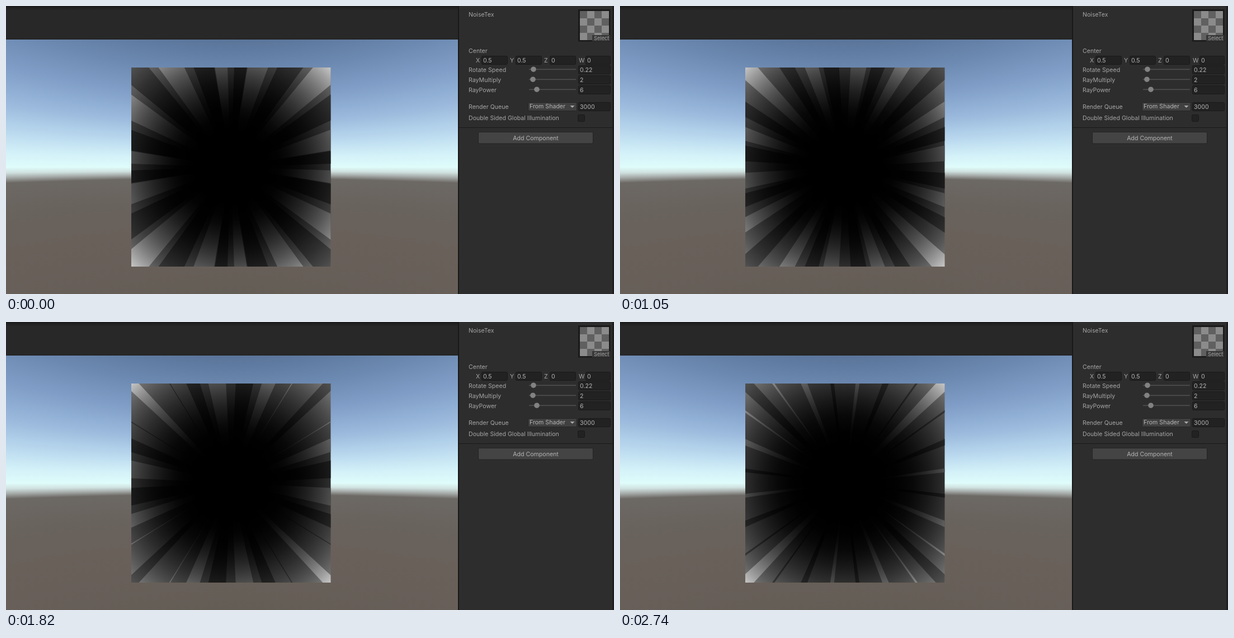
An HTML page with a canvas for the animation above (2.81 s loop, 1087 px wide and 515 px high).

```html
<!DOCTYPE html>
<html lang="en">
<head>
<meta charset="utf-8">
<title>Radial rays</title>
<style>
  html, body { margin: 0; width: 100%; height: 100%; overflow: hidden; background: #2d2d2d; }
  canvas, svg { position: absolute; left: 0; top: 0; display: block; }
  canvas { top: 60px; }
  text { font: 10.6px Inter, Roboto, sans-serif; fill: #a6a6a6; }
  .value { fill: #b4b4b4; }
  .small { font-size: 9.3px; }
</style>
</head>
<body>
<canvas id="sky" width="808" height="455"></canvas>
<svg id="stage" width="1087" height="515" viewBox="0 0 1087 515">
  <defs>
    <clipPath id="quad"><rect x="224" y="110" width="356.5" height="356"/></clipPath>
    <linearGradient id="bar" x2="0" y2="1">
      <stop offset="0" stop-color="#191919"/>
      <stop offset=".06" stop-color="#212121"/>
      <stop offset=".14" stop-color="#282828"/>
      <stop offset=".95" stop-color="#282828"/>
      <stop offset="1" stop-color="#242424"/>
    </linearGradient>
  </defs>
  <rect width="808" height="60" fill="url(#bar)"/>
  <g clip-path="url(#quad)">
    <rect x="224" y="110" width="357" height="356" fill="url(#mid)"/>
    <path id="darkRays" fill="url(#dark)"/>
    <path id="brightRays" fill="url(#bright)"/>
  </g>
  <g id="panel"></g>
</svg>
<script>
const NS = 'http://www.w3.org/2000/svg';
const $ = id => document.getElementById(id);
const CX = 402, CY = 288, HALF = 178;

function add(parent, tag, attrs, text) {
  const el = document.createElementNS(NS, tag);
  for (const key in attrs) el.setAttribute(key, attrs[key]);
  if (text) el.textContent = text;
  parent.appendChild(el);
  return el;
}

// Skybox: colour depends on elevation, so each column is the same ramp stretched.
function drawSky() {
  const ctx = $('sky').getContext('2d'), focal = 394, span = 230;
  const ramp = ctx.createLinearGradient(0, -span, 0, span);
  [[-228, '#5a7499'], [-170, '#6c89b1'], [-125, '#7f9dc6'], [-80, '#9ab9dc'],
   [-45, '#b9d8ee'], [-18, '#d3f1f8'], [0, '#dffcfb'], [7, '#d0e2e0'],
   [13, '#a7adab'], [20, '#6c6864'], [60, '#69635d'], [110, '#69605a'], [228, '#645d56']]
    .forEach(([y, color]) => ramp.addColorStop((y + span) / (2 * span), color));
  ctx.fillStyle = ramp;
  for (let x = 0; x < 808; x++) {
    ctx.setTransform(1, 0, 0, Math.hypot(1, (x - 404) / focal), 0, CY - 60);
    ctx.fillRect(x, -span, 1, 2 * span);
  }
}

// Light grows with the sixth power of the radius, in linear space.
function addShade(id, edgeLight) {
  const reach = 256, steps = 32;
  const grad = add($('stage').querySelector('defs'), 'radialGradient',
    { id, gradientUnits: 'userSpaceOnUse', cx: CX, cy: CY, r: reach });
  for (let i = 0; i <= steps; i++) {
    const light = Math.min(1, edgeLight * (i / steps * reach / HALF) ** 6);
    const srgb = light < 0.0031 ? light * 12.92 : 1.055 * light ** (1 / 2.4) - 0.055;
    const v = Math.round(srgb * 255);
    add(grad, 'stop', { offset: i / steps, 'stop-color': `rgb(${v},${v},${v})` });
  }
}

function drawPanel() {
  const panel = $('panel');
  const rect = (x, y, width, height, fill, more) =>
    add(panel, 'rect', { x, y, width, height, fill, ...more });
  const label = (x, y, s, more) => add(panel, 'text', { x, y, ...more }, s);
  const field = (x, y, width, s) => {
    rect(x + .5, y + .5, width - 1, 15, '#222', { stroke: '#191919', rx: 2 });
    label(x + 3, y + 12, s, { class: 'value' });
  };

  rect(808, 0, 279, 515, '#2d2d2d');
  rect(808, 0, 2, 515, '#181818');
  rect(1084, 0, 3, 515, '#1e1e1e');

  label(827, 19, 'NoiseTex');
  rect(1023, 6, 57.5, 57.5, '#1a1a1a');
  for (let i = 0; i < 16; i++) {
    const col = i % 4, row = i >> 2;
    rect(1026 + col * 13, 9 + row * 13, 13, 13, (col + row) % 2 ? '#8b8b8b' : '#606060');
  }
  rect(1048, 52, 32, 11, '#383838');
  label(1051, 61, 'Select', { class: 'small' });

  label(827, 84, 'Center');
  [['X', 840, 850, 47, '0.5'], ['Y', 901, 911, 47, '0.5'],
   ['Z', 962, 972, 47, '0'], ['W', 1024, 1036, 45, '0']].forEach(([name, x, boxX, w, v]) => {
    label(x, 101, name);
    field(boxX, 89, w, v);
  });

  [['Rotate Speed', 114, 943, '0.22'], ['RayMultiply', 132, 942, '2'],
   ['RayPower', 150, 949, '6']].forEach(([name, y, knob, v]) => {
    label(827, y + 4, name);
    rect(935, y - 1.5, 84, 1.6, '#505050');
    add(panel, 'circle', { cx: knob, cy: y - .8, r: 4.8, fill: '#828282' });
    field(1023, y - 8, 58, v);
  });

  label(827, 184, 'Render Queue');
  rect(933.5, 172.5, 87, 15, '#404040', { stroke: '#252525', rx: 2 });
  label(936, 183, 'From Shader', { class: 'value' });
  add(panel, 'path', { d: 'M1008.5 178h8l-4 4z', fill: '#a8a8a8' });
  field(1023, 172, 58, '3000');

  label(827, 204, 'Double Sided Global Illumination');
  rect(1022.5, 194.5, 12, 12, '#222', { stroke: '#191919', rx: 2 });

  rect(810, 217, 274, 1, '#181818');
  rect(844.5, 225.5, 205, 20.5, '#444', { stroke: '#232323', rx: 2 });
  label(947, 240, 'Add Component', { 'text-anchor': 'middle', class: 'value' });
}

// Each ray set samples a checkerboard along a circle four cells in radius.
const DEG = Math.PI / 180;
const quarter = [0];
for (let k = 1; k < 4; k++) {
  const a = Math.asin(k / 4) / DEG;
  quarter.push(a, 90 - a);
}

function checker(deg) {
  const cell = f => Math.floor(4 * f(deg * DEG));
  return (cell(Math.cos) + cell(Math.sin)) & 1 ? 1 : -1;
}

function wedge(from, to) {
  const at = a => `${(CX + 300 * Math.sin(a * DEG)).toFixed(2)} ${(CY - 300 * Math.cos(a * DEG)).toFixed(2)}`;
  return `M${CX} ${CY}L${at(from)}L${at(to)}Z`;
}

function drawRays(turn) {
  const edges = [];
  for (let q = 0; q < 360; q += 90)
    for (const a of quarter) edges.push((q + a + turn) % 360, (q + a - turn + 360) % 360);
  edges.sort((a, b) => a - b);
  let bright = '', dark = '';
  edges.forEach((from, i) => {
    const to = i + 1 < edges.length ? edges[i + 1] : edges[0] + 360;
    if (to - from < 1e-4) return;
    const middle = (from + to) / 2;
    const level = checker(middle - turn) + checker(middle + turn);
    if (level > 0) bright += wedge(from, to);
    if (level < 0) dark += wedge(from, to);
  });
  $('brightRays').setAttribute('d', bright);
  $('darkRays').setAttribute('d', dark);
}

const LOOP = 2810, STEPS = 40;
const stepStart = i => 70 * i - (i > 3 && i < 13 ? 10 : 0) + (i > 36 ? 10 : 0);

let shown = -1;
function update(ms) {
  let step = STEPS - 1;
  while (step > 0 && stepStart(step) > ms) step--;
  if (step === shown) return;
  shown = step;
  drawRays(39.5 - 0.855 * step);
}

drawSky();
addShade('dark', 0.0105);
addShade('mid', 0.027);
addShade('bright', 0.07);
drawPanel();
update(0);

const begin = performance.now();
function tick() {
  update((performance.now() - begin) % LOOP);
  requestAnimationFrame(tick);
}
requestAnimationFrame(tick);
</script>
</body>
</html>
```
